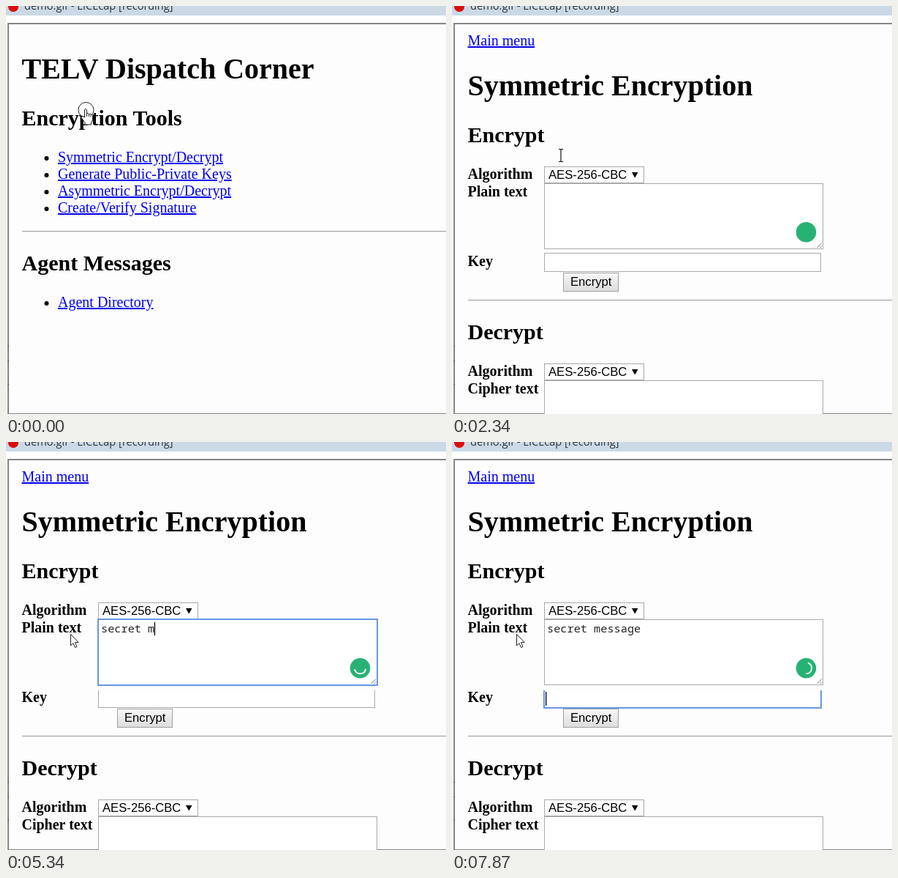
An HTML page for the animation above (8 s loop, 602x557 px).

```html
<!DOCTYPE html>
<html lang="en">
<head>
<meta charset="utf-8">
<title>Encryption tools demo</title>
<style>
  html, body { margin: 0; width: 100%; height: 100%; overflow: hidden; background: #fff; }
  svg { display: block; }
  text { font: 20px "Liberation Serif", serif; white-space: pre; }
  .h1 { font-size: 40px; font-weight: bold; }
  .h2 { font-size: 30px; font-weight: bold; }
  .label { font-weight: bold; }
  .link { fill: #00e; text-decoration: underline; }
  .ui { font: 16.667px "Liberation Sans", sans-serif; }
  .mono { font: 15.27px "Noto Sans Mono", monospace; fill: #222; }
  .title { font: 14.6px "Open Sans", sans-serif; fill: #333; }
  .box { fill: #fff; stroke: #a9a9a9; }
  .focus { fill: none; stroke: #6797e0; stroke-width: 2; }
  .rule { stroke: #999; }
  .pointer { fill: #fff; stroke: #222; stroke-linejoin: round; }
</style>
</head>
<body>
<svg width="602" height="557" viewBox="0 0 602 557">
  <defs>
    <linearGradient id="face" x2="0" y2="1">
      <stop stop-color="#f8f8f8"/><stop offset="1" stop-color="#dcdcdc"/>
    </linearGradient>
    <g id="select">
      <rect class="box" x="126.5" y="219.5" width="136" height="22"/>
      <text class="ui" x="132" y="236">AES-256-CBC</text>
      <path d="M246 227h8.500l-4.250 7.500z"/>
    </g>
  </defs>

  <rect width="602" height="13" fill="#cbd9e7"/>
  <circle cx="10" cy="1" r="7" fill="#d90f0f"/>
  <text class="title" x="25" y="4.500">demo.gif - LICEcap [recording]</text>
  <path d="M602 557H3V24H602" fill="#fdfdfd" stroke="#858585" stroke-width="2"/>
  <path d="M2 464.500h2M2 484.500h2M2 516.500h2" stroke="#555"/>

  <g id="home">
    <text class="h1" x="21.500" y="99">TELV Dispatch Corner</text>
    <text class="h2" x="21.500" y="163">Encryption Tools</text>
    <text class="link" x="71" y="213">Symmetric Encrypt/Decrypt</text>
    <text class="link" x="71" y="236">Generate Public-Private Keys</text>
    <text class="link" x="71" y="259">Asymmetric Encrypt/Decrypt</text>
    <text class="link" x="71" y="282">Create/Verify Signature</text>
    <path class="rule" d="M22 307.500H602"/>
    <text class="h2" x="21.500" y="361">Agent Messages</text>
    <text class="link" x="71" y="411">Agent Directory</text>
    <path d="M55.500 208v0m0 23v0m0 23v0m0 23v0m0 129v0" stroke="#000" stroke-width="6" stroke-linecap="round"/>
  </g>

  <g id="form">
    <text class="link" x="21.500" y="54">Main menu</text>
    <text class="h1" x="21.500" y="122">Symmetric Encryption</text>
    <text class="h2" x="21.500" y="186">Encrypt</text>
    <text class="label" x="21.500" y="236">Algorithm</text>
    <text class="label" x="21.500" y="260">Plain text</text>
    <text class="label" x="21.500" y="355">Key</text>
    <use href="#select"/>
    <rect class="box" x="126.500" y="242.500" width="381" height="89"/>
    <path d="M499.500 330l6.500-6.500M503.500 330l2.500-2.500" stroke="#777"/>
    <rect id="areaFocus" class="focus" x="126" y="242" width="382" height="90"/>
    <rect class="box" x="126.500" y="337.500" width="378" height="25"/>
    <rect id="keyCover" x="125" y="336" width="382" height="3" fill="#fdfdfd"/>
    <path id="keyFocus" class="focus" d="M126 339V363H505V339"/>
    <rect x="152.500" y="364.500" width="75" height="25" fill="url(#face)" stroke="#a0a0a0"/>
    <text class="ui" x="162" y="382">Encrypt</text>
    <path class="rule" d="M22 401.500H602"/>
    <text class="h2" x="21.500" y="455">Decrypt</text>
    <text class="label" x="21.500" y="505">Algorithm</text>
    <text class="label" x="21.500" y="529">Cipher text</text>
    <use href="#select" y="269"/>
    <rect class="box" x="126.500" y="511.500" width="381" height="89"/>
    <text id="typed" class="mono" x="130" y="260"></text>
    <rect id="caret" width="1.300"/>
    <g id="badge">
      <circle cx="484.500" cy="308.700" r="13.800" fill="#27b274"/>
      <path id="spinner" d="M486.500 301.300A7.700 7.700 0 0 1 486.500 316.100" fill="none" stroke="#e9fff4" stroke-width="2" stroke-linecap="round"/>
    </g>
  </g>

  <g id="cursor">
    <circle id="ring" r="10.500" cx=".5" cy="2" fill="#fff" fill-opacity=".8" stroke="#222"/>
    <path id="hand" class="pointer" d="M-1.500 12V1.500q1.500-2.500 3 0V7q1.500-1.500 3 .5 1.500-1 2.500.7 2-.8 2.500 1.300V14q0 3-2 5v3H-1v-3l-5-6.500q0-2.500 2.500-1.500zM1.500 7v4M4.500 8v3M7 8.500v3"/>
    <path id="arrow" class="pointer" d="M.5 .5V16L4 12.600 6.500 18.500 9 17.500 6.500 11.600H11.200z"/>
    <circle id="busy" cx="13.500" cy=".7" r="5.700" fill="#fff" stroke="#2f93e8" stroke-width="4.600"/>
    <path id="beam" d="M-3-8.500h2.300l.7.700.7-.7H3M0-8V8M-3 8.500h2.300l.7-.7.700.7H3" fill="none" stroke="#111" stroke-width="1.200"/>
  </g>
</svg>
<script>
const LOOP = 8000, CHAR = 9.165, MESSAGE = "secret message";
const ui = {};
document.querySelectorAll("[id]").forEach(el => ui[el.id] = el);

const show = (el, on) => el.style.display = on ? "" : "none";
const within = (t, from, to) => t >= from && t < to;
const spread = (from, to, count) =>
  Array.from({ length: count }, (_, i) => from + (to - from) * i / (count - 1));

// The screen refreshes only at these moments.
const typing = spread(5190, 6200, 8);
const ticks = [0, 120, 680, 960, 1390,
  ...spread(1950, 2340, 4), ...spread(2740, 3440, 5), ...spread(3850, 4390, 5),
  ...spread(4660, 4910, 3), ...typing, ...spread(6350, 7370, 9), ...spread(7510, 7870, 4)];
const strokes = [4120, 4255, 4390, 4660, 4785, 4910, ...typing];

// Pointer hotspot: time, x, y
const path = [[0, 109, 140], [1820, 109, 140], [2340, 149, 204], [2565, 149, 204],
  [2915, 166, 272], [3090, 160, 274], [3440, 88, 262], [LOOP, 88, 262]];

function pointerAt(t) {
  const i = path.findIndex(p => p[0] > t);
  const [t0, x0, y0] = path[i - 1], [t1, x1, y1] = path[i];
  const k = (t - t0) / (t1 - t0);
  return [Math.round(x0 + (x1 - x0) * k), Math.round(y0 + (y1 - y0) * k)];
}

function drawPointer(t) {
  const [x, y] = pointerAt(t);
  const hand = t < 120 || within(t, 680, 960);
  const beam = within(t, 2200, 3200);
  ui.cursor.setAttribute("transform", `translate(${x} ${y})`);
  show(ui.hand, hand);
  show(ui.beam, beam);
  show(ui.arrow, !hand && !beam);
  show(ui.busy, !hand && t < 1950);
  show(ui.ring, t < 120 || within(t, 2915, 3090));
}

function drawForm(t) {
  const count = strokes.filter(s => s <= t).length;
  const inKey = t >= 6860;
  ui.typed.textContent = MESSAGE.slice(0, count);
  show(ui.areaFocus, t >= 2915 && !inKey);
  show(ui.keyFocus, inKey);
  show(ui.keyCover, t >= 3850);

  show(ui.caret, within(t, 2915, 3440) || within(t, 3850, 6730) || within(t, 6860, 7370) || t >= 7870);
  ui.caret.setAttribute("x", inKey ? 128 : 130 + count * CHAR - .5);
  ui.caret.setAttribute("y", inKey ? 341 : 246);
  ui.caret.setAttribute("height", inKey ? 19 : 18);

  show(ui.badge, t >= 2080);
  show(ui.spinner, t >= 5190);
  ui.spinner.setAttribute("transform", `rotate(${90 + (t - 5340) * .395} 484.5 308.7)`);
}

function frame() {
  const now = performance.now() % LOOP;
  const t = Math.max(...ticks.filter(s => s <= now));
  show(ui.home, t < 1390);
  show(ui.form, t >= 1390);
  drawForm(t);
  drawPointer(t);
  requestAnimationFrame(frame);
}
frame();
</script>
</body>
</html>
```
